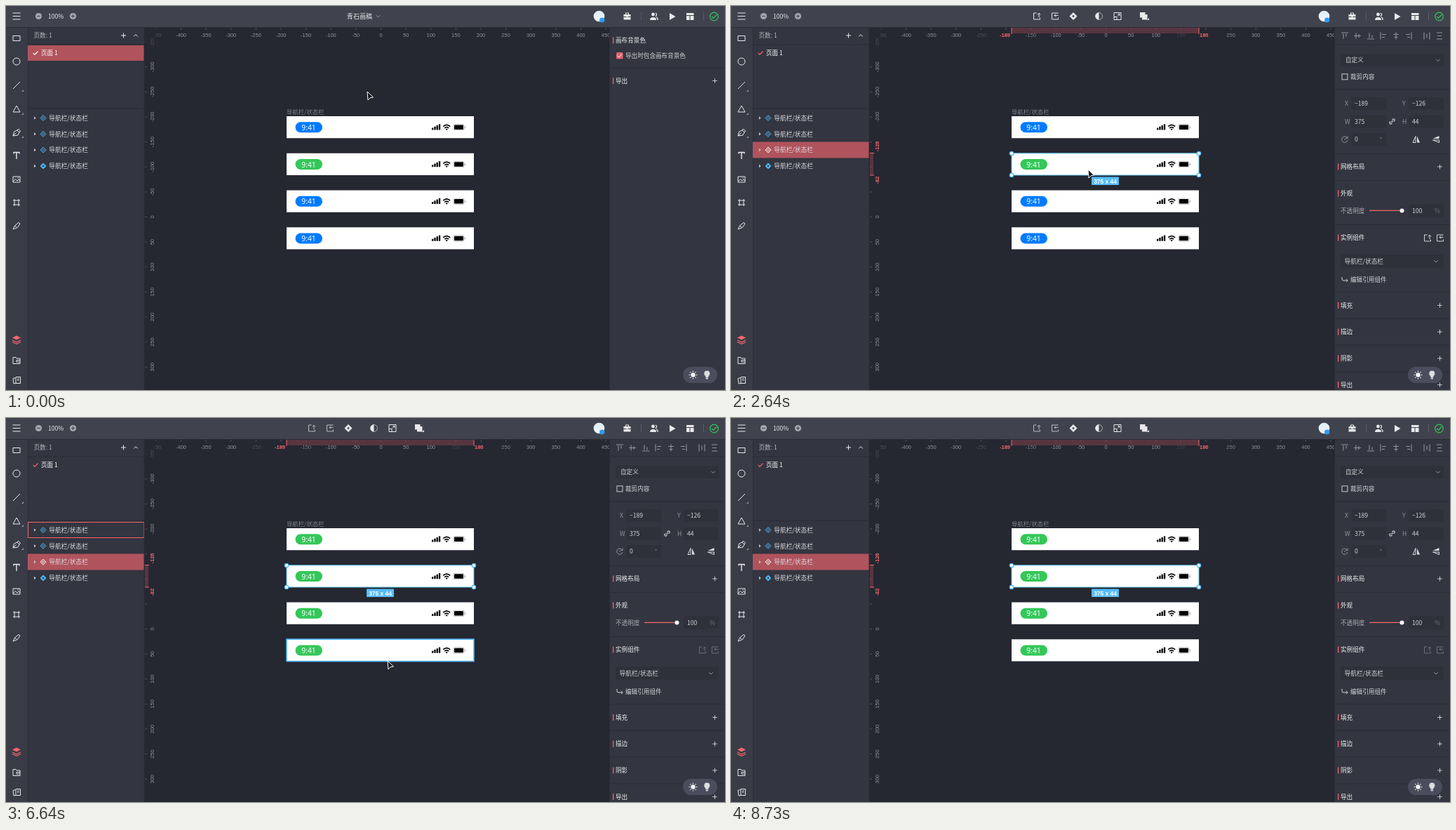
These frames come from a looping animation (1025x547 px, 9540 ms). An HTML page with a canvas:

```html
<!DOCTYPE html>
<html lang="zh">
<head>
<meta charset="utf-8">
<style>
html, body { margin: 0; width: 100%; height: 100%; overflow: hidden; background: #252731; }
canvas { display: block; }
</style>
</head>
<body>
<canvas id="stage" width="1025" height="547"></canvas>
<script>
const c = document.getElementById('stage').getContext('2d');
const LOOP = 9540, SCALE = 0.7125;
const SELECT = 2640, TOOLTIP = 4520, PUSH = 6020, TOOLTIP_END = 6170;
const PANEL = '#333540', TOP = '#40434e', CANVAS = '#252731', LINE = '#2a2c36', FIELD = '#2e303a';
const WHITE = '#e9e9ec', GRAY = '#92949c', DIM = '#6d707a', RED = '#f2666c', ROW = '#b0535d';
const BLUE = '#4fb7fb', GREEN = '#34c759', BLACK = '#000';
const CJK = '"Noto Sans CJK SC","Noto Sans CJK",sans-serif';
const ARIAL = '"Liberation Sans",sans-serif';
const LAYER = '导航栏/状态栏';

// Pointer: time, x, y, hovered bar (-1 for none)
const pointer = [
  [0, 515, 122, -1], [150, 513, 150, -1], [300, 512, 168, 0], [540, 511, 180, 0],
  [840, 509, 199, 0], [990, 506.5, 213, 0], [1140, 508, 226, 1], [1290, 509, 233, 1],
  [1590, 510, 239, 1], [1740, 511, 246, -1], [1890, 511, 245, -1], [2040, 510, 238, 1], [2190, 509, 233, 1],
  [2640, 509, 233, -1], [2790, 640, 255, -1], [3030, 786, 286, -1],
  [3330, 838, 298, -1], [3480, 886, 311, -1], [3630, 928, 321, -1], [3780, 962, 328, -1],
  [3920, 980, 330, -1], [4070, 989, 330, -1],
  [6460, 760, 340, -1], [6640, 544, 346, 3], [6790, 522, 295, 3], [6940, 506, 258, 2],
  [7090, 494, 212, -1], [7240, 483, 166, -1], [7390, 483, 166, 0],
  [7540, 494, 178, 0], [7690, 540, 236, -1], [7840, 618, 324, -1], [7990, 700, 404, -1], [8130, 757, 456, -1],
  [8430, 852, 494, -1], [8580, 970, 538, -1], [8730, 1100, 600, -1]
];

function rect(x, y, w, h, color, r = 0) {
  c.fillStyle = color;
  c.beginPath();
  c.roundRect(x, y, w, h, r);
  c.fill();
}
function box(x, y, w, h, color, lw = 1) {
  c.strokeStyle = color;
  c.lineWidth = lw;
  c.strokeRect(x, y, w, h);
}
function dot(x, y, r, color) {
  rect(x - r, y - r, 2 * r, 2 * r, color, r);
}
function text(s, x, y, color = WHITE, size = 8.6, align = 'left', font = CJK, weight = 400) {
  c.font = `${weight} ${size}px ${font}`;
  c.textAlign = align;
  c.fillStyle = color;
  c.fillText(s, x, y + size * 0.37);
}
function draw(x, y, d, stroke, fill, lw = 1) {
  const p = new Path2D(d);
  c.save();
  c.translate(x, y);
  c.lineWidth = lw;
  c.lineJoin = 'round';
  if (fill) { c.fillStyle = fill; c.fill(p); }
  if (stroke) { c.strokeStyle = stroke; c.stroke(p); }
  c.restore();
}
const circle = r => `M${r} 0A${r} ${r} 0 1 1 ${-r} 0A${r} ${r} 0 1 1 ${r} 0Z`;
const plus = (x, y, color = WHITE, r = 3.5) => draw(x, y, `M${-r} 0H${r}M0 ${-r}V${r}`, color);
const chevron = (x, y, color = GRAY) => draw(x, y, 'M-2.8-1.3L0 1.5 2.8-1.3', color);
const check = (x, y, color, lw = 1.2) => draw(x, y, 'M-3.3 0L-1 2.4 3.5-2.5', color, null, lw);
const pushIcon = (x, y, color) => draw(x, y, 'M-1-4.5h-4v9h9v-2M2.5 2V-4M.3-2l2.2-2.3 2.2 2.3', color);
const resetIcon = (x, y, color) => draw(x, y, 'M4.5-4.5h-9v9h9V2M4.5-1H-1M1-3L-1-1 1 1', color);
const clamp = v => Math.max(0, Math.min(1, v));
const barTop = i => 157 + 52.75 * i;

function rulers(selected) {
  if (selected) {
    rect(400, 31, 267, 8, '#58353f');
    rect(198, 210, 5, 31, '#58353f');
    for (const x of [400, 667]) rect(x - 0.5, 31, 1, 9, RED);
    for (const y of [209.5, 241]) rect(198, y - 0.5, 6, 1, RED);
    text('-189', 398, 41, RED, 7.5, 'right', ARIAL, 700);
    text('186', 668, 41, RED, 7.5, 'left', ARIAL, 700);
  }
  const fade = (p, marks) => selected ? Math.min(...marks.map(m => clamp((Math.abs(p - m) - 30) / 10))) : 1;
  for (let v = -450; v <= 450; v += 50) {
    const x = 534.5 + v * SCALE, y = 300.5 + v * SCALE;
    c.globalAlpha = v == -450 ? 0.4 : 1;
    rect(x - 0.5, 31, 1, 3, '#51535c');
    c.globalAlpha *= fade(x, [390, 674]);
    text(v, x, 41, GRAY, 7.5, 'center', ARIAL);
    if (v >= -350 && v <= 300) {
      c.globalAlpha = v == -350 ? 0.35 : 1;
      rect(198, y - 0.5, 3, 1, '#51535c');
      c.globalAlpha *= fade(y, [200, 248]);
      vertical(v, y, GRAY);
    }
  }
  c.globalAlpha = 1;
  if (selected) {
    vertical('-126', 200, RED, 700);
    vertical('-82', 248, RED, 700);
  }
}
function vertical(s, y, color, weight) {
  c.save();
  c.translate(208.5, y);
  c.rotate(-Math.PI / 2);
  text(s, 0, 0, color, 7.5, 'center', ARIAL, weight);
  c.restore();
}

function statusBar(y, color) {
  rect(400, y, 267, 31.3, '#fff');
  rect(412.5, y + 8.3, 38.5, 15, color, 7.5);
  text('9:41', 431.5, y + 16, '#fff', 10.3, 'center', '"Noto Sans",sans-serif');
  for (let i = 0; i < 4; i++) rect(607 + i * 3.3, y + 16.6 - i * 1.8, 2.3, 3 + i * 1.8, BLACK, 0.5);
  draw(628.2, y + 19.5, 'M-5-4.9Q0-9.5 5-4.9M-3-2.6Q0-5.3 3-2.6', BLACK, null, 1.7);
  draw(628.2, y + 19.8, 'M-1.6-1.4Q0-2.6 1.6-1.4L0 .4Z', null, BLACK);
  rect(637.5, y + 11.2, 16, 9, '#a6a6a6', 2);
  rect(638, y + 11.7, 15, 8, '#fff', 1.6);
  rect(638.9, y + 12.5, 13.2, 6.4, BLACK, 1.2);
  rect(654, y + 14.2, 1, 3, '#a6a6a6', 0.5);
}

function board(selected, pushed, hover) {
  text(LAYER, 400, 150.5, hover == 0 ? BLUE : '#82848b', 8.4);
  for (let i = 0; i < 4; i++) {
    const y = barTop(i);
    statusBar(y, pushed || i == 1 ? GREEN : '#007bff');
    if (i == hover) box(400, y - 0.2, 267, 31.5, BLUE, 1.6);
  }
  if (!selected) return;
  box(400, 209.8, 267, 31.2, '#58c1e8');
  for (const x of [400, 667]) for (const y of [210, 241]) draw(x, y, circle(2.7), BLUE, '#fff', 1.2);
  rect(514, 243.5, 39, 11.5, '#57bdfb', 1);
  text('375 x 44', 533.5, 249.5, '#fff', 8.4, 'center', ARIAL, 700);
}

function toolStrip() {
  rect(0, 31, 31, 516, '#393c47');
  const tools = [
    [46, 'M-5-3.5H5V3.5H-5Z'], [79, circle(5)], [113, 'M-5 5L5-5'], [147, 'M0-5L5 4H-5Z'],
    [180, 'M-5 5L-3.5-1 1-3 4 0 2 4ZM1-3L2.5-5 5.5-2 4 0M-5 5L-.5 .5'],
    [247, 'M-5-4H5V4H-5ZM-5 3L-1.5-.5 1 2 3 0 5 2M1.5-2h1.5'],
    [280, 'M-3-5V5M3-5V5M-5-3H5M-5 3H5'], [313, 'M-5 5L-2.5 0 3-4.5 5-3 1.5 2.5ZM-2.5 0L0 2'],
    [505, 'M-5-4.5H-1L0-3H5V4.5H-5ZM0-.5H5M0-.5V2H5'], [533, 'M-5-2.5L-1-3.5V4.5L-4 5ZM-1-4.5H5.5V4.5H-1M1-2H3.5M1 0H3.5']
  ];
  for (const [y, d] of tools) draw(15, y, d, WHITE);
  draw(15, 213, 'M-4-2.5V-4.5H4V-2.5M0-4.5V5', WHITE, null, 1.4);
  for (const y of [122, 155, 188]) draw(25, y, 'M0-3V0H-3Z', null, GRAY);
  draw(15, 474, 'M0-4.5L6-1.5 0 1.5-6-1.5Z', null, RED);
  draw(15, 476, 'M-6 0L0 3 6 0M-6 2.5L0 5.5 6 2.5', RED, null, 1.3);
}

function layerPanel(selected, hover) {
  rect(31, 31, 166, 516, PANEL);
  rect(31, 31, 1, 516, LINE);
  text('页数: 1', 39.5, 42, '#b4b5bb');
  plus(167.5, 42);
  draw(185, 42, 'M-2.8 1.5L0-1.3 2.8 1.5', WHITE);
  rect(31, 54.5, 166, 1, LINE);
  if (!selected) rect(31, 56, 166, 22, ROW);
  check(42, 67, selected ? RED : '#fff');
  text('页面 1', 50, 67, '#fff');
  rect(31, 145.5, 166, 1, LINE);
  for (let i = 0; i < 4; i++) {
    const y = 159.5 + 22.8 * i, active = selected && i == 2;
    if (active) rect(31, y - 11.5, 166, 23, ROW);
    if (hover >= 0 && i == 3 - hover) box(31.5, y - 11, 165, 22, RED);
    draw(41, y, 'M-1-2.3L1.7 0-1 2.3Z', null, '#c3c4c9');
    const color = active ? '#fff' : BLUE;
    draw(53, y, 'M0-4L4 0 0 4-4 0Z', color, i == 3 ? color : null);
    draw(53, y, 'M0-1.7L1.7 0 0 1.7-1.7 0Z', i == 3 ? null : color, i == 3 ? PANEL : null, 0.9);
    text(LAYER, 61.3, y, '#dcdde0', 8.7);
  }
  rect(196.5, 31, 1, 516, LINE);
}

function topBar(selected, pushed) {
  rect(0, 0, 1025, 30, TOP);
  rect(0, 30, 1025, 1, LINE);
  draw(15, 14.5, 'M-5.5-4.5H5.5M-5.5 0H5.5M-5.5 4.5H5.5', WHITE, null, 1.1);
  for (const x of [46.5, 95.5]) {
    dot(x, 14.5, 4.6, '#a4a6ae');
    draw(x, 14.5, x < 50 ? 'M-2.5 0H2.5' : 'M-2.5 0H2.5M0-2.5V2.5', TOP);
  }
  text('100%', 71, 14.5, WHITE, 8.6, 'center');
  if (selected) {
    const color = pushed ? '#b9bac0' : WHITE;
    pushIcon(436.5, 14.5, color);
    resetIcon(462, 14.5, color);
    draw(488, 14.5, 'M0-5.5L5.5 0 0 5.5-5.5 0ZM0-1.8L-1.8 0 0 1.8 1.8 0Z', null, WHITE);
    draw(524.5, 14.5, circle(5), '#a9abb2');
    draw(524.5, 14.5, 'M0-5A5 5 0 0 0 0 5Z', null, WHITE);
    draw(551, 14.5, 'M-5-5H5V5H-5ZM-5 1H-1V5M0 0L3-3M.5-3H3V-.5', WHITE);
    draw(588, 14, 'M-5-5H2.5V-2H5.5V5.5H-2V2.5H-5Z', null, WHITE);
    draw(596, 20, 'M0-3V0H-3Z', null, WHITE);
  } else {
    text('青石画稿', 504, 14.5, WHITE, 9.1, 'center');
    chevron(530.5, 14.5);
  }
  const sky = c.createLinearGradient(0, 6, 0, 23);
  sky.addColorStop(0, '#dcecf6');
  sky.addColorStop(1, '#f4f7f9');
  dot(845.5, 14.5, 7.8, sky);
  dot(849.7, 20, 3.6, '#2e9bf5');
  draw(885.5, 15, 'M-5-3H5V4.5H-5Z', null, WHITE);
  draw(885.5, 15, 'M-2-3V-5H2V-3', WHITE, null, 1.2);
  draw(885.5, 15, 'M-5 .5H-1M1 .5H5', TOP);
  for (const x of [905, 994]) rect(x, 9, 1, 11, '#5c5f6a');
  dot(922.5, 12, 2.4, WHITE);
  draw(922.5, 15, 'M-4.5 5Q-4.5 1 0 1T4.5 5Z', null, WHITE);
  draw(924, 15, 'M2-5Q5-3 2 0M3 1Q5.5 2 5 5', WHITE, null, 1.3);
  draw(950, 15, 'M-4-5L4.5 0-4 5Z', null, WHITE);
  rect(970, 10, 10.5, 3, WHITE);
  rect(970, 14, 4.5, 6, WHITE);
  rect(975.5, 14, 5, 6, WHITE);
  draw(1009.5, 15, circle(5.8), GREEN, null, 1.2);
  check(1009.5, 15, GREEN);
}

function heading(s, y, add) {
  rect(865, y - 4.5, 1.3, 9, RED);
  text(s, 869, y, '#f0f0f2');
  if (add) plus(1010.5, y, '#c9cacf', 3.3);
}
const divider = y => rect(861, y, 164, 1, LINE);

function field(label, value, x, y) {
  if (label) text(label, x - 13, y, GRAY);
  rect(x - 4, y - 9, 50, 18, FIELD, 2);
  text(value, x + 1, y, '#d3d4d8');
}

function inspector(selected, pushed) {
  rect(861, 31, 164, 516, PANEL);
  rect(860, 31, 1, 516, LINE);
  if (!selected) {
    heading('画布背景色', 49);
    rect(870, 66, 9.5, 9.5, '#e0626a', 1.5);
    check(874.7, 70.7, '#fff', 1);
    text('导出时包含画布背景色', 883, 70.5, '#d3d4d8');
    divider(87.5);
    heading('导出', 106.5, true);
    return;
  }
  const aligns = [
    [875, 'M-5-4.5H5M-2-3V4M2-3V1'], [893, 'M-5 0H5M-2-4V4M2-2.5V2.5'], [912, 'M-5 4.5H5M-2 3V-4M2 3V-1'],
    [930, 'M-4-5V5M-2-2H4M-2 2H2'], [948, 'M0-5V5M-4-2H4M-2.5 2H2.5'], [966, 'M4-5V5M2-2H-4M2 2H-2'],
    [992, 'M-4-5V5M4-5V5M0-3V3'], [1010, 'M-4-4.5H4M-4 4.5H4M-3 0H3']
  ];
  for (const [x, d] of aligns) draw(x, 42.5, d, GRAY, null, 1.1);
  divider(54.5);
  rect(869, 68, 147, 18, FIELD, 2);
  text('自定义', 876, 77, '#d3d4d8');
  chevron(1008, 77);
  box(871, 96.8, 8, 8, '#c9cacf');
  text('裁剪内容', 883, 101, '#d3d4d8');
  divider(118.5);
  field('X', '−189', 888, 139);
  field('Y', '−126', 970, 139);
  field('W', '375', 888, 164.5);
  field('H', '44', 970, 164.5);
  draw(942.5, 164.5, 'M-1 1L1-1M0-2L1.5-3.5Q3.5-4 3.8-1.5L2 0M0 2L-1.5 3.5Q-3.5 4-3.8 1.5L-2 0', '#c9cacf', null, 1.2);
  field('', '0', 888, 190);
  text('°', 925, 190, GRAY);
  draw(875, 190, 'M3.5-2A4.2 4.2 0 1 0 4 1M4-4.5V-1.5H1M-1 0H1', GRAY);
  draw(977, 190, 'M-1-4.5V4.5H-5Z', '#dcdde0');
  draw(977, 190, 'M1-4.5V4.5H5Z', null, '#dcdde0');
  draw(1005, 190, 'M-4.5-1H4.5V-5Z', null, '#dcdde0');
  draw(1005, 190, 'M-4.5 1H4.5V4.5Z', '#dcdde0');
  divider(210);
  heading('网格布局', 229, true);
  divider(248);
  heading('外观', 267);
  text('不透明度', 869, 291.5, '#a9abb2');
  rect(910, 290.8, 46, 1.3, RED);
  dot(956.5, 291.5, 3, '#fff');
  field('', '100', 970, 291.5);
  text('%', 1003, 291.5, DIM);
  divider(311);
  heading('实例组件', 330);
  const color = pushed ? DIM : '#d3d4d8';
  pushIcon(993.5, 330.5, color);
  resetIcon(1011, 330.5, color);
  rect(869, 354, 147, 19, FIELD, 2);
  text(LAYER, 874.5, 363.5, '#d3d4d8', 8.7);
  chevron(1005, 363.5);
  draw(875, 390, 'M-4-4V-1Q-4 1-2 1H4M2-1.2L4.2 1 2 3.2', '#d3d4d8');
  text('编辑引用组件', 883, 390, '#d3d4d8');
  ['填充', '描边', '阴影', '导出'].forEach((s, i) => {
    divider(407 + 37.8 * i);
    heading(s, 426.5 + 37.7 * i, true);
  });
}

function themeSwitch() {
  rect(965, 514, 49, 23, '#4a4d5b', 11.5);
  dot(979.5, 525.5, 3.2, '#f2f2f4');
  for (let i = 0; i < 8; i++) {
    const a = i * Math.PI / 4;
    dot(979.5 + 5.2 * Math.cos(a), 525.5 + 5.2 * Math.sin(a), 0.8, '#f2f2f4');
  }
  dot(999.3, 523.5, 4, '#dcdde0');
  rect(997.3, 526, 4, 3, '#dcdde0');
  rect(997.5, 529.6, 3.6, 1.8, '#dcdde0', 0.8);
}

function render(t) {
  const [, x, y, hover] = pointer.findLast(k => k[0] <= t);
  const selected = t >= SELECT, pushed = t >= PUSH;
  rect(0, 0, 1025, 547, CANVAS);
  rulers(selected);
  // The leftmost ruler label slides under the corner
  rect(197, 31, 15, 14, CANVAS);
  board(selected, pushed, hover);
  layerPanel(selected, hover);
  toolStrip();
  inspector(selected, pushed);
  topBar(selected, pushed);
  themeSwitch();
  if (t >= TOOLTIP && t < TOOLTIP_END) {
    rect(968, 343.5, 51, 20, '#4b4f60', 3);
    text('推送属性', 993.5, 353.5, '#fff', 8.6, 'center');
  }
  if (t >= 4070 && t < TOOLTIP_END) {
    draw(x, y, 'M-1 2C-1 .5 1 .5 1 2V5L5 6Q6.5 6.5 6 8.5L5 12H0L-3 8.5Q-3.5 6.5-1 8Z', '#fff', '#111');
  } else {
    draw(x, y, 'M0 0L1 12 4 8.8 8.5 8Z', '#fff', '#15161b');
  }
}

function tick(now) {
  render(now % LOOP);
  requestAnimationFrame(tick);
}
requestAnimationFrame(tick);
</script>
</body>
</html>
```
